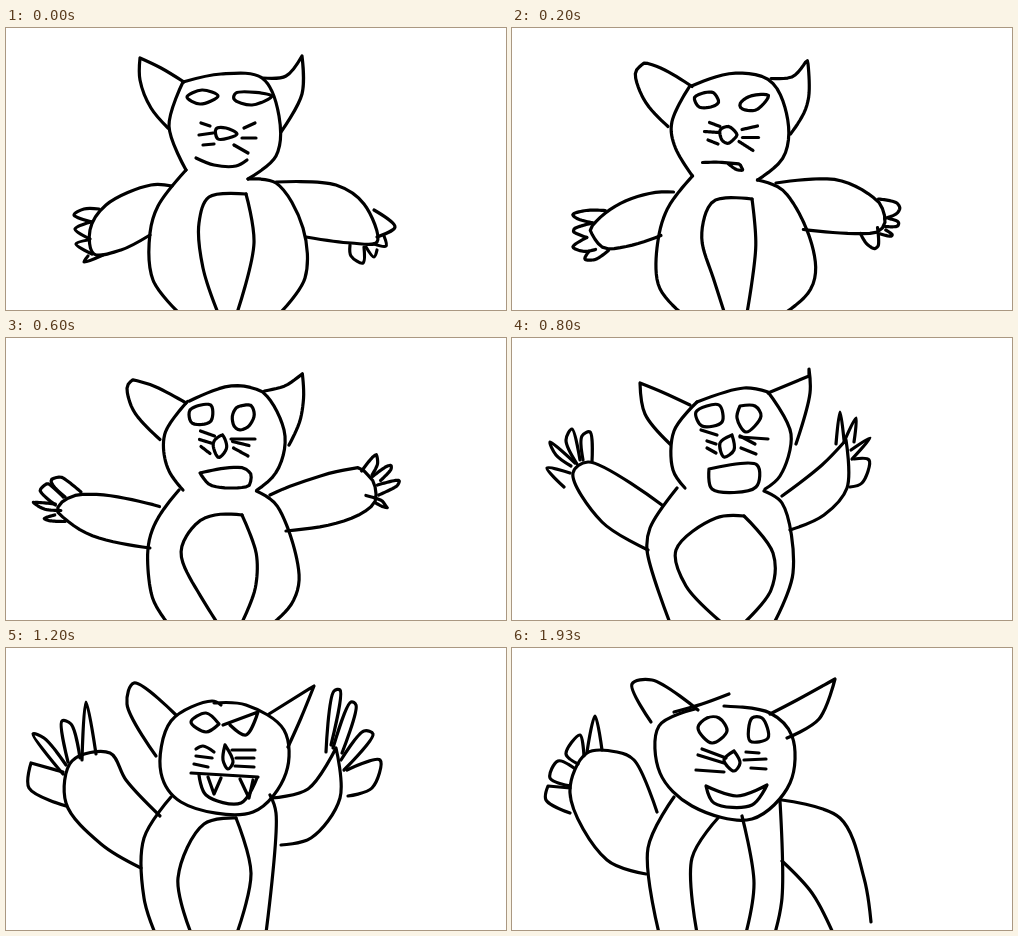
An HTML page that plays this animation: 500 px wide and 282 px high, repeating every 2200 ms.

```html
<!DOCTYPE html>
<html lang="en">
<head>
<meta charset="utf-8">
<title>Waving cat</title>
<style>
  html, body { margin: 0; width: 100%; height: 100%; overflow: hidden; background: #fff; }
  #stage { position: relative; width: 500px; height: 282px; overflow: hidden; }
  #strip {
    position: absolute; left: 0; top: 0; width: 4000px; height: 282px;
    fill: none; stroke: #000; stroke-width: 3.2; stroke-linecap: round; stroke-linejoin: round;
    animation: flip 2200ms step-end infinite;
  }
  /* one drawing per 500px of the strip */
  @keyframes flip {
    0% { transform: translateX(0); }
    9.0909% { transform: translateX(-500px); }
    18.1818% { transform: translateX(-1000px); }
    27.2727% { transform: translateX(-1500px); }
    36.3636% { transform: translateX(-2000px); }
    45.4545% { transform: translateX(-2500px); }
    54.5454% { transform: translateX(-3000px); }
    87.7272%, 100% { transform: translateX(-3500px); }
  }
</style>
</head>
<body>
<!-- Strokes are split by ";". "!" marks a sharp corner, "z" closes a stroke. -->
<div id="stage"><svg id="strip" viewBox="0 0 4000 282">
<g data-slot="0"
  data-ears="178,54 155,40 134,30! 134,52 145,80 162,100;257,50 280,48 296,28! 296,66 275,104"
  data-head="177,54 215,46 256,50 273,88 270,128 242,151;177,54 163,98 180,142"
  data-eyes="181,69 196,62 212,68 194,76 z;266,68 230,65 228,71 246,77 z"
  data-face="220,100 210,101 212,111 231,106 z;195,95 204,98;193,107 207,105;197,117 208,116;238,100 249,95;236,110 250,110;228,117 242,125"
  data-mouth="190,130 208,137 230,138 241,132"
  data-left="166,158 145,157 100,177 84,202 88,226 115,222 144,207;93,181 78,181 68,187 86,194;85,194 69,201 84,211;82,212 70,216 86,226;82,228 78,234 97,227"
  data-right="270,154 330,157 358,176 371,214 345,215 300,209;368,182 389,199 371,209;378,208 380,218 368,216;371,222 368,229 360,219;344,217 345,228 357,235 358,219"
  data-body="180,142! 152,178 144,205 147,252 172,284;242,151 270,155 297,200 299,250 275,284;240,166 203,169 193,195 197,240 212,285;240,166 248,215 231,285"/>
<g data-slot="2"
  data-ears="182,63 145,42 114,41 122,69 150,97;261,51 282,49 295,34! 296,85 282,108"
  data-head="182,62 222,45 262,57 279,100 272,132 249,153;178,63 156,98 160,126 181,154;167,56 182,62"
  data-eyes="184,70 203,67 199,83 182,82 z;247,67 230,73 228,88 243,88 z"
  data-face="213,97 206,103 213,120 219,107 z;200,94 212,99;192,100 206,104;195,107 204,116;222,103 242,101;225,109 243,109;226,110 240,120;222,100 232,98"
  data-mouth="191,139! 215,134 243,134! 244,146! 220,145 z"
  data-left="157,170 115,178 75,203! 100,214 154,208;97,184 58,186 62,191 80,196;80,196 56,203 70,208;72,207 57,222 72,225 85,217;76,219 72,228 85,231 99,218"
  data-right="258,156 318,147 368,166! 370,185 345,195 282,194;360,160 378,156 380,167 369,172;370,173 386,171 388,178 373,181;371,182 387,184 388,190 372,193;349,194 369,208 368,180"
  data-body="181,154 158,185 145,262 164,284;249,153 272,170 306,245 298,270 274,284;240,176 200,177 187,212 203,250 213,285;240,176 239,285"/>
<g data-slot="4"
  data-ears="178,67 150,54 128,45! 133,76 158,106;256,55 297,38! 297,31! 298,55 284,106"
  data-head="185,64 232,50 256,54! 279,96 268,138 253,151;185,64 162,93 161,132 173,150"
  data-eyes="184,74 207,67 210,84 190,88 z;243,68 228,68! 225,80 234,94 249,78 z"
  data-face="220,97! 208,105 212,119 222,112 z;189,92 205,97;195,103 204,106;195,110 204,115;228,99 256,101;228,98 243,106;229,110 244,116"
  data-mouth="197,131! 245,127 244,149 200,151 z"
  data-left="150,167 76,124 61,135 90,184 136,212;80,124 78,94 70,98 71,122;68,122 60,91 54,102 65,126;63,125 38,104 44,117 59,128;58,135 35,130 52,149"
  data-right="270,158 310,127 334,102! 335,150 312,177 278,192;324,106 328,74 332,102;332,104 344,80 342,104;339,112 358,100 340,121;342,121 357,122 350,145 338,149"
  data-body="165,150 138,190 135,212 158,285;252,153 270,165 281,235 262,285;232,178 204,180 164,212 174,248 209,284;232,178 261,215 259,252 233,284"/>
<g data-slot="5"
  data-ears="179,70 130,47 119,68 152,107;220,70 270,58 309,41 304,42 296,70 278,93"
  data-head="187,54 238,55 273,78 275,133 230,166 175,148 154,110 172,74 200,58"
  data-eyes="185,71 187,83 198,89 211,77;190,65 214,77;228,72 226,82 238,90 251,78 246,67;217,75 254,65"
  data-face="220,97! 211,112 220,124 227,116 z;192,100 208,106;195,108 206,110;187,117 207,115;229,103 250,102;232,109 256,111;231,115 249,118"
  data-mouth="192,126 225,134 258,128! 256,150 230,158 195,143 z;199,133 208,149! 215,134! 215,153;231,135 241,152! 246,133"
  data-left="152,166 125,150 84,115 64,132 85,185 145,224;77,118 77,80 84,80 86,116;72,118 58,86 75,115;64,125 38,105 50,106 68,118;57,131 31,138 40,157 66,164"
  data-right="270,157 293,144 333,108! 333,158 305,190 270,201;317,106 328,65 327,104;331,105 345,86 340,108;335,116 358,101 340,124;343,123 358,124 348,150 335,157"
  data-body="165,150 141,205 147,285;262,150 274,215 261,285;202,177 184,230 184,285;200,177 225,170 248,205 235,285"/>
<g data-slot="6"
  data-ears="170,67 128,35 121,56 150,108;263,66 308,38! 295,70 282,99"
  data-head="215,57 206,53 165,73 155,125 175,154 247,164 280,125 278,82 240,57 208,55"
  data-eyes="200,65 185,74 200,84 213,76! z;217,77 252,64! 240,87 224,77"
  data-face="219,97! 217,112 222,121 227,114 z;190,101 197,98 208,104;190,108 206,110;188,116 202,119;226,102 249,102;230,110 248,110;229,118 248,119"
  data-mouth="185,125 252,129;193,127 200,147 235,155 251,130;202,129 208,146! 215,130;234,131 243,150! 247,132"
  data-left="154,168 120,132 104,105 66,113 60,155 95,196 135,220;76,112 80,54 90,106;62,114 56,73 65,76 74,110;57,126 27,86 38,90 60,117;57,124 25,115! 23,140 60,158"
  data-right="266,150 302,141 330,100! 334,150 305,190 275,197;320,104 328,43 334,42 325,97;327,100 345,54 350,57 336,105;335,112 358,83 367,86 338,122;341,122 374,112 366,140 342,148"
  data-body="165,149 138,190 138,250 149,285;264,147 270,165 260,285;230,170 198,176 172,230 185,285;230,170 245,225 231,285"/>
<g data-slot="7"
  data-ears="186,62 140,32 120,36 139,74;162,64 190,56 217,46;258,66 285,52 323,31! 307,71 275,90"
  data-head="183,61 147,78 148,125 180,158 240,171 278,135 280,88 258,65 212,58"
  data-eyes="195,70 186,80 200,95 215,83 207,70 z;240,70 238,93 256,90 250,70 z"
  data-face="222,103! 212,112 222,123 228,115 z;186,107 212,115;190,101 214,110;184,122 212,124;234,104 247,105;232,112 254,111;239,120 254,121"
  data-mouth="194,138! 225,148 255,137! 240,157 202,155 z"
  data-left="145,164 122,112 105,104 75,105 58,145 95,212 134,226;75,104 83,68 90,102;72,108 68,87 54,106 66,116;62,120 46,113 38,130 58,138;58,140 36,138! 34,152 58,165"
  data-right="270,152 328,170 352,230 359,274;270,213 300,245 321,285"
  data-body="162,149 136,200 147,285;268,153 270,250 263,285;206,170 180,210 185,285;230,168 242,235 234,285"/>
</svg></div>
<script>
const strip = document.getElementById("strip");
const SVG = "http://www.w3.org/2000/svg";
const PARTS = ["ears", "head", "eyes", "face", "mouth", "left", "right", "body"];

// First control point after b on a centripetal spline through a, b, c
function handle(a, b, c) {
  const p = Math.sqrt(Math.hypot(b[0] - a[0], b[1] - a[1]));
  const q = Math.sqrt(Math.hypot(c[0] - b[0], c[1] - b[1]));
  if (!p || !q) return b;
  return b.map((v, k) =>
    (p * p * c[k] - q * q * a[k] + (2 * p * p + 3 * p * q + q * q) * v) / (3 * p * (p + q)));
}

function curve(stroke) {
  const words = stroke.trim().split(" ");
  const closed = words[words.length - 1] === "z";
  if (closed) words.pop();
  const pts = words.flatMap(w => {
    const xy = w.replace("!", "").split(",").map(Number);
    return w.endsWith("!") ? [xy, xy] : [xy];
  });
  const n = pts.length;
  const at = i => pts[closed ? (i + n) % n : Math.max(0, Math.min(n - 1, i))];
  let d = "M" + pts[0];
  for (let i = 0; i < (closed ? n : n - 1); i++) {
    const [a, b, c, e] = [at(i - 1), at(i), at(i + 1), at(i + 2)];
    if (b !== c) d += `C${handle(a, b, c)} ${handle(e, c, b)} ${c}`;
  }
  return d;
}

function addPath(d, slot) {
  const path = document.createElementNS(SVG, "path");
  path.setAttribute("d", d);
  path.setAttribute("transform", `translate(${slot * 500} 0)`);
  strip.append(path);
  return path;
}

// Every drawing becomes { part: [paths] }
const poses = [...strip.querySelectorAll("g")].map(g => {
  const pose = {};
  for (const part of PARTS)
    pose[part] = g.dataset[part].split(";").map(s => addPath(curve(s), g.dataset.slot));
  return pose;
});

// Halfway drawing; arms reach further out while they swing
function between(from, to, slot, reach) {
  const steps = 30, middle = 215, shoulder = 65;
  for (const part of PARTS) {
    const arm = part === "left" || part === "right";
    from[part].slice(0, to[part].length).forEach((a, i) => {
      const b = to[part][i];
      const la = a.getTotalLength(), lb = b.getTotalLength();
      const pts = Array.from({ length: steps + 1 }, (_, k) => {
        const p = a.getPointAtLength(la * k / steps);
        const q = b.getPointAtLength(lb * k / steps);
        let x = (p.x + q.x) / 2;
        const off = x - middle;
        if (arm) x += Math.sign(off) * reach * Math.max(0, Math.abs(off) - shoulder);
        return [x, (p.y + q.y) / 2];
      });
      addPath("M" + pts.join("L"), slot);
    });
  }
}

between(poses[0], poses[1], 1, 0.03);
between(poses[1], poses[2], 3, 0.22);
</script>
</body>
</html>
```
